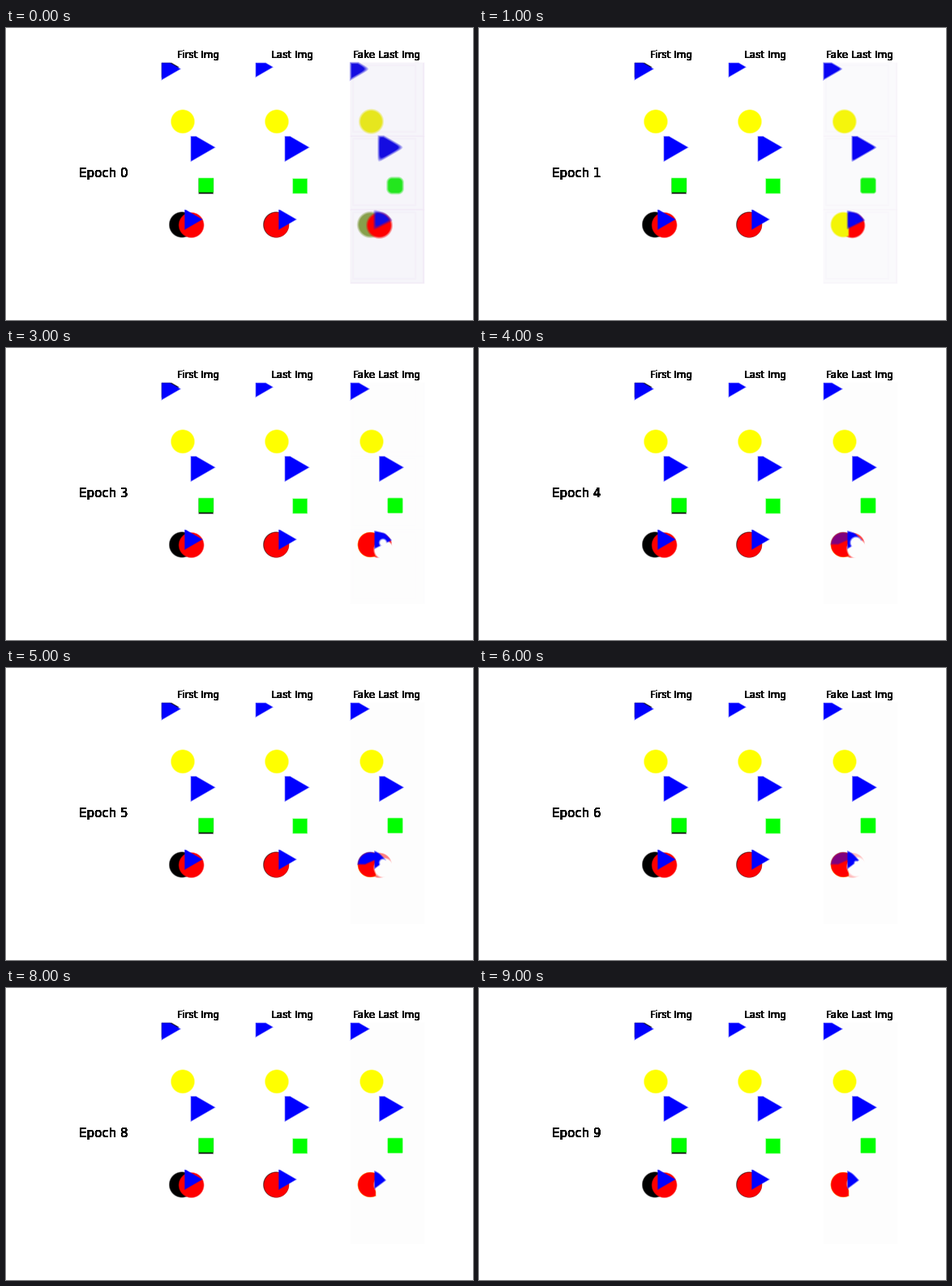
A matplotlib script for the animation above (10000 ms loop, 576x360 px).

```python
import numpy as np
import matplotlib.pyplot as plt
from matplotlib.animation import FuncAnimation

W, H, DPI = 576, 360, 72
EPOCHS, STEP = 10, 1000
TOP, CELL = 43, 90.6
LEFT = (192, 308, 425)

BLUE, RED, YELLOW = (0, 0, 255), (255, 0, 0), (255, 255, 0)
GREEN, BLACK = (0, 255, 0), (0, 0, 0)

Y, X = np.mgrid[0:H, 0:W] + 0.5


# Signed distances, negative inside
def disc(x, y, r):
    return np.hypot(X - x, Y - y) - r


def box(x0, y0, x1, y1, r=0):
    dx = np.abs(X - (x0 + x1) / 2) - (x1 - x0) / 2 + r
    dy = np.abs(Y - (y0 + y1) / 2) - (y1 - y0) / 2 + r
    outer = np.hypot(np.maximum(dx, 0), np.maximum(dy, 0))
    return outer + np.minimum(np.maximum(dx, dy), 0) - r


def poly(*pts, k=0.3):
    """Convex polygon, points clockwise on screen; k rounds the corners."""
    sides = []
    for (x0, y0), (x1, y1) in zip(pts, pts[1:] + pts[:1]):
        dx, dy = x1 - x0, y1 - y0
        sides.append(((X - x0) * dy - (Y - y0) * dx) / np.hypot(dx, dy))
    top = np.max(sides, axis=0)
    return top + k * np.log(sum(np.exp((d - top) / k) for d in sides))


def arrow(tip_x, tip_y, h, k=0.3):
    """Equilateral triangle pointing right."""
    half = h / np.sqrt(3)
    return poly((tip_x - h, tip_y - half), (tip_x, tip_y),
                (tip_x - h, tip_y + half), k=k)


def mix(a, b, t):
    return np.array(a) + (np.array(b, float) - np.array(a)) * t


def paint(img, color, d, soft=1.5, alpha=1.0):
    m = np.clip(0.5 - d / soft, 0, 1) * alpha
    img += (np.array(color, float) - img) * m[..., None]


def in_cell(d, col, row):
    x, y = LEFT[col], TOP + CELL * row
    return np.maximum(d, box(x, y, x + 91, y + CELL))


def real_columns():
    img = np.full((H, W, 3), 255.0)

    def put(col, row, color, d):
        paint(img, color, in_cell(d, col, row))

    # Black copies mark where the moving shapes end up
    put(0, 0, BLACK, arrow(213.3, 48.2, 30))
    put(0, 0, BLUE, arrow(215.3, 50.5, 30))
    put(1, 0, BLUE, arrow(329.3, 48.2, 30))
    put(0, 1, BLACK, box(237.8, 186, 255.6, 204.3))
    put(0, 1, GREEN, box(237.6, 185, 256, 202.8))
    put(1, 1, GREEN, box(353.8, 185.8, 371.6, 204))
    put(0, 2, BLACK, disc(217, 242.5, 15.7))
    put(0, 2, RED, disc(228.6, 243, 15.5))
    put(1, 2, BLACK, disc(333.1, 242.5, 15.7))
    put(1, 2, RED, disc(333.5, 242.7, 15.5))
    for col, x in enumerate(LEFT[:2]):
        put(col, 0, YELLOW, disc(x + 26, 115.3, 14.5))
        put(col, 1, BLUE, arrow(x + 66, 147.2, 30))
        put(col, 2, BLUE, arrow(x + 50.3, 236, 22))
    return img


def backdrop(img, noise):
    """Tinted tiles that fade to near white."""
    bg = 254 - np.array((8, 9, 4)) * noise
    paint(img, bg, box(425, TOP, 516, 315), 1)
    for row in range(3):
        y = TOP + CELL * row
        frames_ = box(424, y - 1, 515, y + CELL), box(428, y + 3, 505, y + 85)
        for d, line in zip(frames_, ((240, 230, 245), (243, 238, 248))):
            paint(img, line, in_cell(np.abs(d) - 0.7, 2, row), 2, noise)
    return bg


def overlap_tile(put, e, bg, blue, fuzz):
    """Two overlapping discs and a wedge, slowly told apart."""
    late = np.clip((e - 3) / 2, 0, 1)
    tip = 475.5 - 7 * late
    ghost = disc(460.5, 243.3, 15.3)
    whole = disc(449.3, 242.5, 15.3)
    body = np.maximum(whole, X - 456)
    core = np.maximum(body, disc(450.5, 242, 11 * e - 16))
    cap = np.maximum(body, Y - 242 + 0.45 * np.maximum(X - 443, 0))
    bite = disc(466, 250 - 1.2 * (e - 2), min(12, 14 * e - 16))
    hole = disc(465, 240, 7 - 2.5 * abs(e - 4))
    wedge = poly((454.5, 225.5), (tip - 8, 228.5), (tip, 237),
                 (454.5, 247.5), k=0.5 + fuzz / 2)

    discs = [(RED, ghost, np.clip(1.75 - e / 4, 0, 1)),
             (mix(YELLOW, (135, 160, 75), 0.1 ** e), body, 1)]
    for color, d, a in discs if e else discs[::-1]:
        put(2, color, d, 1.5 + fuzz, a)
    put(2, RED, core, 1.5 + 2 * (e < 3))
    put(2, BLUE, cap, 2.5, max(0, 1 - abs(e - 5) / 2))
    put(2, bg, bite, 2.5)
    put(2, blue, wedge, 2 + fuzz)
    put(2, bg, hole, 2.5)


def render(e):
    img = BASE.copy()
    noise = 0.4 ** e
    bg = backdrop(img, noise)
    fuzz = 1.8 * noise
    blue = mix(BLUE, (20, 12, 225), noise)

    def put(row, color, d, soft=1.5 + fuzz, alpha=1.0):
        paint(img, color, in_cell(d, 2, row), soft, alpha)

    k = 0.3 + fuzz
    put(0, blue, arrow(448.3 - noise, 50.5, 30, k))
    put(0, mix(YELLOW, (230, 230, 30), noise), disc(451 - noise / 2, 115.3, 14.4))
    put(1, blue, arrow(490.5 - noise, 147.2, 30, k))
    put(1, mix(GREEN, (35, 230, 30), noise),
        box(470.8 - noise / 2, 185 - noise / 2, 489.2 + noise / 2,
            203.6 + noise / 2, 1 + 5 * noise))
    overlap_tile(put, e, bg, blue, fuzz)
    return np.clip(img, 0, 255).astype(np.uint8)


plt.rcParams["font.family"] = "DejaVu Sans"
fig = plt.figure(figsize=(W / DPI, H / DPI), dpi=DPI, facecolor="white")
ax = fig.add_axes([0, 0, 1, 1])
ax.axis("off")
BASE = real_columns()
frames = [render(e) for e in range(EPOCHS)]
pic = ax.imshow(frames[0], aspect="auto", interpolation="nearest")


def label(x, y, text, size, times=16):
    # Stacked copies give the heavy, hard-edged lettering
    return [fig.text(x / W, 1 - y / H, text, size=size, ha="center",
                     va="baseline", color="black") for _ in range(times)]


for i, title in enumerate(("First Img", "Last Img", "Fake Last Img")):
    label(236.97 + 116.45 * i, 37, title, 12)
counter = label(120.5, 184, "Epoch 0", 15)


def update(epoch):
    pic.set_data(frames[epoch])
    for t in counter:
        t.set_text(f"Epoch {epoch}")
    return [pic, *counter]


anim = FuncAnimation(fig, update, frames=EPOCHS, interval=STEP,
                     repeat=True, repeat_delay=0, blit=False)
plt.show()
```
